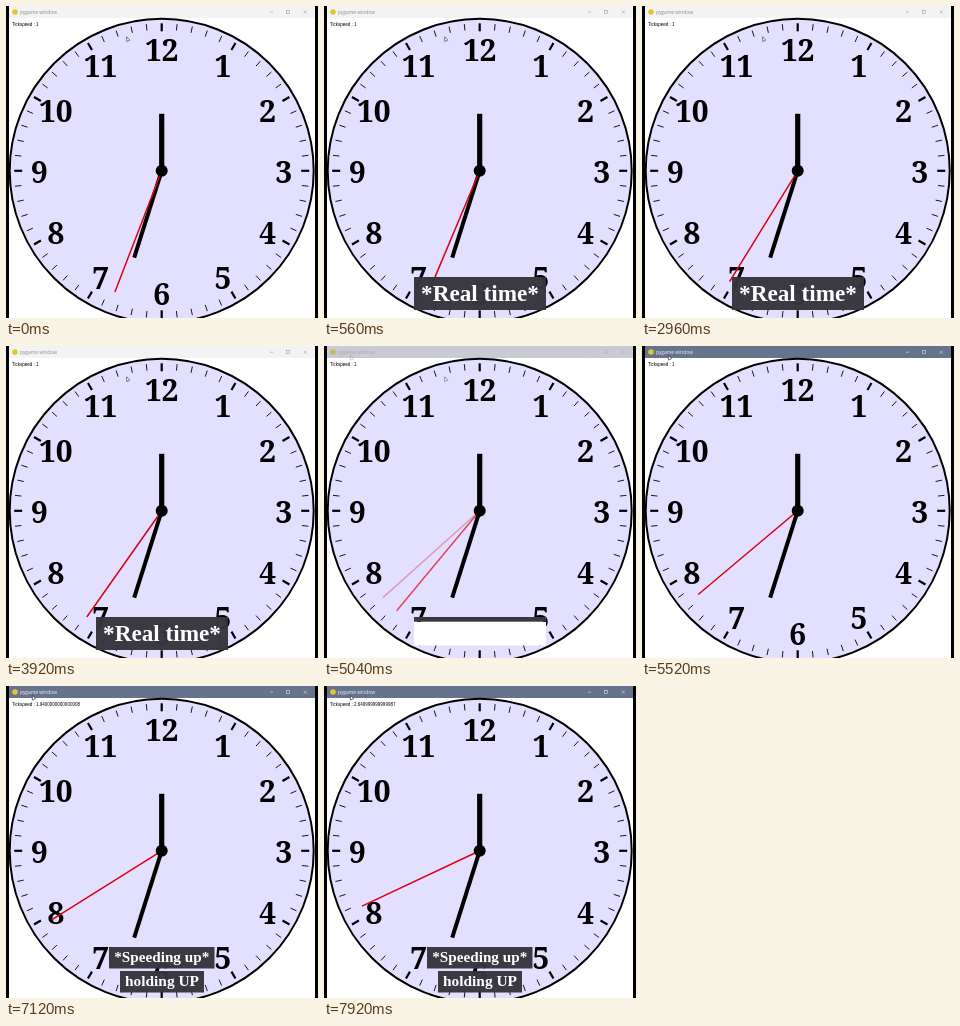
Animation, 312 px wide and 312 px high, one loop 8 s. Source, as an HTML page with a canvas:

```html
<!DOCTYPE html>
<html lang="en">
<head>
<meta charset="utf-8">
<title>Clock</title>
<style>
html, body { margin: 0; width: 100%; height: 100%; overflow: hidden; background: #000; }
canvas { display: block; width: 100vw; height: 100vh; }
</style>
</head>
<body>
<canvas id="stage" width="312" height="312"></canvas>
<script>
const ctx = document.getElementById('stage').getContext('2d');
const LOOP = 8000, CX = 155.7, CY = 164.8;
const FADE_START = 4880, FADE_END = 5400, RAMP_START = 6075;
const SERIF = '"Liberation Serif", serif', SANS = '"Liberation Sans", sans-serif';
// [ms, degrees past six o'clock] of the second hand before the cut
const SWEEP = [[0, 21.1], [560, 22.8], [2000, 28], [3920, 35.2], [5040, 39.7], [5600, 41.9]];

const clamp = x => Math.max(0, Math.min(1, x));

function rect(x, y, w, h, color) {
  ctx.fillStyle = color;
  ctx.fillRect(x, y, w, h);
}

function text(str, x, y, font, color, align = 'left') {
  ctx.font = font;
  ctx.fillStyle = color;
  ctx.textAlign = align;
  ctx.fillText(str, x, y);
}

function line(x1, y1, x2, y2, width, color) {
  ctx.lineWidth = width;
  ctx.strokeStyle = color;
  ctx.beginPath();
  ctx.moveTo(x1, y1);
  ctx.lineTo(x2, y2);
  ctx.stroke();
}

function disc(x, y, r, color) {
  ctx.fillStyle = color;
  ctx.beginPath();
  ctx.arc(x, y, r, 0, 2 * Math.PI);
  ctx.fill();
}

// Radial stroke; angle in degrees clockwise from twelve
function spoke(deg, from, to, width, color = '#000') {
  const a = deg * Math.PI / 180, s = Math.sin(a), c = -Math.cos(a);
  line(CX + s * from, CY + c * from, CX + s * to, CY + c * to, width, color);
}

function cursor(x, y) {
  ctx.beginPath();
  ctx.moveTo(x, y);
  ctx.lineTo(x, y + 4.6);
  ctx.lineTo(x + 3.2, y + 3.4);
  ctx.closePath();
  ctx.fillStyle = '#fff';
  ctx.fill();
  ctx.lineWidth = 0.6;
  ctx.strokeStyle = '#222';
  ctx.stroke();
}

function titleBar(bg, fg) {
  rect(3, 0, 306, 12, bg);
  disc(9, 6, 2.8, '#e6c62e');
  text('pygame window', 14, 7.9, '4.9px "Open Sans", sans-serif', fg);
  line(264, 6.2, 267, 6.2, 0.5, fg);
  ctx.strokeRect(280.5, 4.7, 2.8, 2.8);
  line(297.8, 4.7, 300.8, 7.7, 0.5, fg);
  line(300.8, 4.7, 297.8, 7.7, 0.5, fg);
}

function face() {
  disc(CX, CY, 152, '#e3dfff');
  ctx.lineWidth = 2;
  ctx.strokeStyle = '#000';
  ctx.stroke();
  for (let i = 0; i < 60; i++) {
    const major = i % 5 === 0;
    spoke(i * 6, major ? 139.5 : 141, 147.5, major ? 2.2 : 0.9);
  }
  for (let n = 1; n <= 12; n++) {
    const a = n * Math.PI / 6;
    text(n, CX + 122.3 * Math.sin(a), 177 - 122.3 * Math.cos(a),
      'bold 30px "Noto Serif", serif', '#000', 'center');
  }
}

function earlyAngle(t) {
  const i = Math.max(1, SWEEP.findIndex(k => k[0] >= t));
  const [t0, a0] = SWEEP[i - 1], [t1, a1] = SWEEP[i];
  return a0 + (a1 - a0) * (t - t0) / (t1 - t0);
}

function lateAngle(t) {
  const s = Math.max(0, t - RAMP_START) / 1000;
  return 48.1 + 3.8 * ((t - 5040) / 1000 + 0.447 * s * s);
}

// Repeated addition keeps the long floating-point tails
function tickSpeed(t) {
  const steps = Math.round(Math.max(0, t - RAMP_START) * 0.0894);
  let v = 1;
  for (let i = 0; i < steps; i++) v += 0.01;
  return v;
}

function caption(str, x, y, w, h, size, base) {
  rect(x, y, w, h, 'rgba(54,52,60,.97)');
  text(str, x + w / 2, base, `bold ${size}px ${SERIF}`, '#fff', 'center');
}

function captions(t) {
  if (t >= 320 && t < 4960) caption('*Real time*', 90, 271, 132, 33, 23.2, 295);
  else if (t >= 4960 && t < 5120) {
    rect(90, 276, 132, 23.5, '#fff');
    rect(90, 271, 132, Math.max(0, 33 - (t - 4960) * 0.35), '#3a383f');
  } else if (t >= 5600) {
    caption('*Speeding up*', 103, 261, 105.5, 21.5, 15.2, 276);
    caption('holding UP', 114, 285, 84, 21.5, 15.4, 300);
  }
}

function draw(t) {
  const p = clamp((t - FADE_START) / (FADE_END - FADE_START));
  const blend = (early, late) => {
    if (p < 1) { ctx.globalAlpha = 1 - p; early(); }
    if (p > 0) { ctx.globalAlpha = p; late(); }
    ctx.globalAlpha = 1;
  };
  const second = deg => spoke(180 + deg, 0, 130, 1.5, '#dc0010');

  rect(0, 0, 312, 312, '#000');
  rect(3, 0, 306, 312, '#fff');
  rect(3, 0, 306, 12, '#f3f3f3');
  blend(() => titleBar('#f3f3f3', '#8c8c8c'), () => titleBar('#67738c', '#f2f2f5'));
  face();
  text('Tickspeed : ' + tickSpeed(t), 6, 20.4, '4.5px ' + SANS, '#000');
  spoke(197.6, 0, 91, 4);
  spoke(0, 0, 57, 5.2);
  blend(() => second(earlyAngle(t)), () => second(lateAngle(t)));
  disc(CX, CY, 6, '#000');
  blend(() => cursor(120.7, 30.8), () => cursor(26.4, 9.4));
  captions(t);
}

function frame() {
  draw(performance.now() % LOOP);
  requestAnimationFrame(frame);
}
frame();
</script>
</body>
</html>
```
